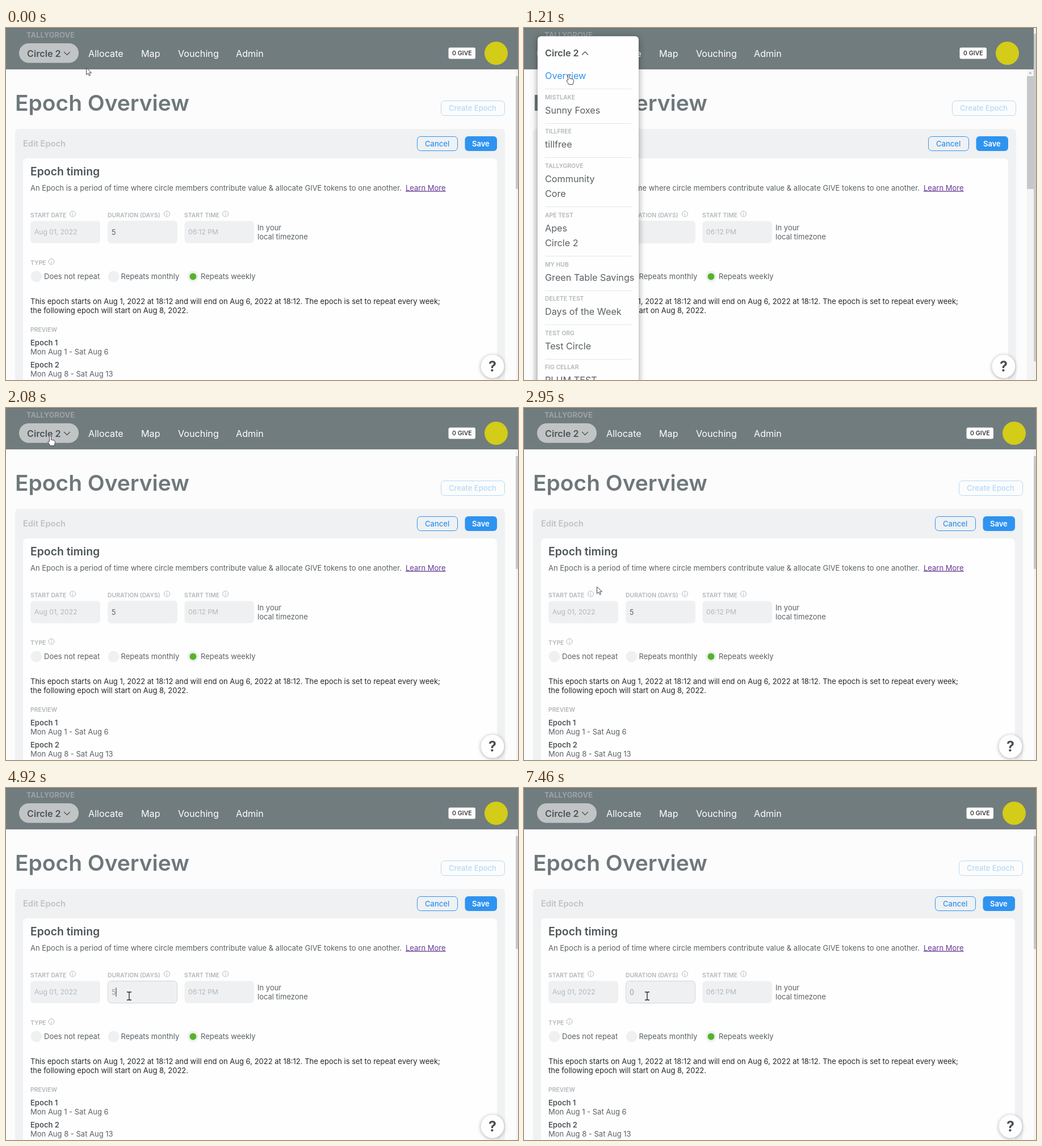
An HTML page for the animation above (8 s loop, 902 by 621 pixels).

```html
<!DOCTYPE html>
<html lang="en">
<head>
<meta charset="utf-8">
<title>Epoch overview</title>
<style>
html, body { margin: 0; width: 100%; height: 100%; overflow: hidden; background: #fcfcfc; }
svg { display: block; font: 13px Inter, sans-serif; --shift: 0px; }
text { white-space: pre; fill: #5a6165; }
.right { transform: translateX(calc(-1 * var(--shift))); }
.panel { width: calc(863px - var(--shift)); fill: #eff1f3; }
.card { width: calc(835px - var(--shift)); fill: #fefefe; }
.nav text { font-size: 16.2px; fill: #fff; }
.label { font-size: 10.4px; font-weight: 600; fill: #b1b7b9; }
.item { font-size: 16.2px; }
.strong { font-weight: 600; fill: #4d5457; }
.circle { font-size: 16.2px; font-weight: 600; fill: #4d5457; }
.dark { fill: #24282a; }
.field { fill: #eff0f2; }
.muted { font-size: 12.1px; fill: #b3b8bb; }
.line { fill: none; stroke: #4d5457; stroke-width: 1.3; stroke-linecap: round; stroke-linejoin: round; }
.info { fill: none; stroke: #b1b7b9; }
#menu { filter: drop-shadow(0 2px 6px #0006); }
</style>
</head>
<body>
<svg id="stage" width="902" height="621" viewBox="0 0 902 621">
  <defs>
    <g id="info" class="info"><circle r="5"/><path d="M0-.5V3M0-3v1.2"/></g>
    <path id="arrow" d="M.5 .5V12.5l3-2.8 2 4.6 2-1-2-4.3h4z" fill="#fff" stroke="#333" stroke-width=".9"/>
    <path id="hand" d="M-1.5 10V1.5a1.5 1.5 0 0 1 3 0V7l5 1q1.8.5 1.8 2.5v2.5q0 2-1.4 4.5H0L-3.7 12q-.9-2 .8-2.2z" fill="#fff" stroke="#444"/>
    <path id="beam" d="M-4-7h3l1 1 1-1h3M0-6V6M-4 7h3l1-1 1 1h3" fill="none" stroke="#222" stroke-width="1.3"/>
  </defs>

  <rect width="902" height="621" fill="#fcfcfc"/>
  <rect width="902" height="73" fill="#717c7f"/>
  <rect width="902" height="1" fill="#667174"/>
  <text x="36" y="17" style="font-weight:700;fill:#9ba3a5">TALLYGROVE</text>
  <rect x="23" y="27" width="105" height="34.5" rx="17.2" fill="#c1c4c5"/>
  <text class="circle" x="37" y="50.5">Circle 2</text>
  <path class="line" d="M102.500 42.500l5 5 5-5"/>
  <g class="nav">
    <text x="145" y="50.500">Allocate</text>
    <text x="238" y="50.500">Map</text>
    <text x="303" y="50.500">Vouching</text>
    <text x="405" y="50.500">Admin</text>
  </g>

  <text x="16" y="146" style="font-size:38.900px;font-weight:600;fill:#6e787b">Epoch Overview</text>
  <rect class="panel" x="16" y="178" height="460" rx="7"/>
  <text x="30" y="209" style="font-size:14.600px;font-weight:600;fill:#bfc3c6">Edit Epoch</text>
  <rect class="card" x="30" y="230" height="420" rx="7"/>

  <g class="right">
    <rect x="779.500" y="34.500" width="47.500" height="20" rx="3" fill="#fdfdfd"/>
    <text x="786" y="48" style="font-size:10.700px;font-weight:500;fill:#222">0 GIVE</text>
    <circle cx="863.500" cy="44.500" r="20.500" fill="#d3cc18"/>
    <g fill="none" stroke="#b5d9f7">
      <rect x="766.500" y="128.500" width="112" height="26" rx="6"/>
      <rect x="724.500" y="191.500" width="71" height="25" rx="6" stroke="#2f93f0"/>
    </g>
    <rect x="808.500" y="191" width="56.500" height="26" rx="6" fill="#2f93f0"/>
    <g style="font-weight:500">
      <text x="780" y="146" style="fill:#b5d9f7">Create Epoch</text>
      <text x="738" y="208.500" style="fill:#2f93f0">Cancel</text>
      <text x="821" y="208.500" style="fill:#fff;font-weight:600">Save</text>
    </g>
  </g>

  <text class="strong" x="43" y="260" style="font-size:19.400px">Epoch timing</text>
  <text x="43" y="286.500">An Epoch is a period of time where circle members contribute value &amp; allocate GIVE tokens to one another.</text>
  <text x="704" y="286.500" style="fill:#663a94;text-decoration:underline">Learn More</text>

  <g class="label">
    <text class="label" x="43" y="333.500">START DATE</text>
    <text class="label" x="179" y="333.500">DURATION (DAYS)</text>
    <text class="label" x="314" y="333.500">START TIME</text>
    <text class="label" x="43" y="417.500">TYPE</text>
    <text class="label" x="43" y="536">PREVIEW</text>
  </g>
  <use href="#info" x="117.500" y="328"/>
  <use href="#info" x="283.500" y="328"/>
  <use href="#info" x="386.500" y="328"/>
  <use href="#info" x="80" y="412"/>

  <rect class="field" x="43" y="340.500" width="123" height="39" rx="6"/>
  <rect class="field" id="duration" x="179.500" y="340.500" width="122" height="39" rx="6"/>
  <rect class="field" x="314.500" y="340.500" width="122.500" height="39" rx="6"/>
  <text class="muted" x="50" y="364">Aug 01, 2022</text>
  <text id="days" x="186" y="364.500" style="font-size:12.600px">5</text>
  <text class="muted" x="321" y="364">06:12 PM</text>
  <rect id="caret" x="193.500" y="352" width="1" height="16" fill="#333"/>
  <text x="443" y="356.500">In your</text>
  <text x="443" y="372.500">local timezone</text>

  <g fill="#eff0f2">
    <circle cx="53.500" cy="438.500" r="10"/>
    <circle cx="189.500" cy="438.500" r="10"/>
    <circle cx="329.500" cy="438.500" r="10"/>
    <circle cx="329.500" cy="438.500" r="6" fill="#56b32b"/>
  </g>
  <text x="67" y="443">Does not repeat</text>
  <text x="202.500" y="443">Repeats monthly</text>
  <text x="343" y="443">Repeats weekly</text>

  <text class="dark" x="43" y="487">This epoch starts on Aug 1, 2022 at 18:12 and will end on Aug 6, 2022 at 18:12. The epoch is set to repeat every week;</text>
  <text class="dark" x="43" y="503">the following epoch will start on Aug 8, 2022.</text>
  <text class="strong" x="43" y="559.500">Epoch 1</text>
  <text x="43" y="576">Mon Aug 1 - Sat Aug 6</text>
  <text class="strong" x="43" y="598.500">Epoch 2</text>
  <text x="43" y="614.500">Mon Aug 8 - Sat Aug 13</text>

  <g class="right">
    <circle cx="857" cy="597" r="20.500" fill="#fefefe" style="filter:drop-shadow(0 1px 3px #0005)"/>
    <text x="857" y="606" text-anchor="middle" style="font-size:25px;font-weight:700;fill:#4a4f52">?</text>
    <rect x="898" y="73" width="12" height="548" fill="#f3f3f3"/>
    <path d="M901.500 80.500l2.500-3 2.500 3z" fill="#a5a5a5"/>
    <rect x="898" y="85" width="12" height="199" fill="#c6c7c8"/>
  </g>

  <g id="overlay">
    <rect x="898" width="4" height="621" fill="#f0f0f0"/>
    <rect x="898" y="10" width="4" height="578" fill="#c9cacb"/>
    <g id="menu">
      <rect x="24" y="14.500" width="178" height="640" rx="6" fill="#fefefe"/>
      <text class="circle" id="current" x="37" y="50">Circle 2</text>
      <path class="line" id="chevron" d="M102.500 47l5-5 5 5"/>
      <text class="item" id="overview" x="37" y="90">Overview</text>
    </g>
  </g>
  <use id="cursor"/>
</svg>
<script>
const $ = id => document.getElementById(id);

const groups = [
  ['MISTLAKE', 'Sunny Foxes'],
  ['TILLFREE', 'tillfree'],
  ['TALLYGROVE', 'Community', 'Core'],
  ['APE TEST', 'Apes', 'Circle 2'],
  ['MY HUB', 'Green Table Savings'],
  ['DELETE TEST', 'Days of the Week'],
  ['TEST ORG', 'Test Circle'],
  ['FIG CELLAR', 'PLUM TEST'],
];
let y = 107.7, rows = '';
for (const [label, ...items] of groups) {
  rows += `<path d="M37 ${Math.floor(y) + .5}h152" stroke="#e4e6e7"/>
    <text class="label" x="37" y="${y + 17.8}">${label}</text>`;
  items.forEach((name, i) => {
    rows += `<text class="item" x="37" y="${y + 42.8 + i * 26.6}">${name}</text>`;
  });
  y += 60.5 + (items.length - 1) * 26.6;
}
$('menu').insertAdjacentHTML('beforeend', rows);

// time, pointer shape, x, y
const path = [
  [0, 'arrow', 141, 70], [199, 'arrow', 141, 70],
  [200, 'hand', 104, 54], [250, 'hand', 84, 48], [290, 'hand', 76, 45],
  [990, 'hand', 76, 45], [1210, 'hand', 79, 82], [1250, 'hand', 79, 82], [1290, 'hand', 80, 84],
  [1450, 'hand', 80, 84], [1780, 'hand', 72, 39], [1929, 'hand', 72, 39],
  [1930, 'hand', 80, 42], [2079, 'hand', 80, 42],
  [2080, 'hand', 78, 49], [2450, 'hand', 78, 49], [2510, 'arrow', 86, 66],
  [2800, 'arrow', 133, 270], [2950, 'arrow', 128, 315], [3890, 'arrow', 128, 315],
  [4080, 'beam', 182, 357], [4170, 'arrow', 210, 381], [4250, 'arrow', 238, 400],
  [4290, 'arrow', 239, 399], [4330, 'arrow', 239, 399], [4410, 'beam', 217, 376],
  [4619, 'beam', 217, 376], [4620, 'beam', 217, 367], [8000, 'beam', 217, 367],
];

const ramp = (t, from, to) => Math.min(1, Math.max(0, (t - from) / (to - from)));
const mix = (a, b, k) => `rgb(${a.map((v, i) => Math.round(v + (b[i] - v) * k))})`;
const BLUE = [47, 147, 240], DARK = [77, 84, 87], TEXT = [90, 97, 101];

function draw(t) {
  const i = path.findIndex(p => p[0] > t) - 1;
  const [t0, shape, x0, y0] = path[i], [t1, , x1, y1] = path[i + 1];
  const k = ramp(t, t0, t1);
  const x = Math.round(x0 + (x1 - x0) * k), y = Math.round(y0 + (y1 - y0) * k);
  $('cursor').setAttribute('href', '#' + shape);
  $('cursor').setAttribute('transform', `translate(${x} ${y})`);

  const open = t >= 250 && t < 2080;
  $('overlay').style.display = open ? '' : 'none';
  $('stage').style.setProperty('--shift', open ? '12px' : '0px');
  const onCurrent = ramp(t, 290, 630) - ramp(t, 990, 1200) + ramp(t, 1550, 1780);
  const onOverview = ramp(t, 1040, 1200) - ramp(t, 1500, 1700);
  $('current').style.fill = $('chevron').style.stroke = mix(DARK, BLUE, onCurrent);
  $('overview').style.fill = mix(TEXT, BLUE, onOverview);

  const focus = t < 4790 ? 0 : t < 4920 ? .5 : 1;
  $('duration').style.stroke = mix([239, 240, 242], [208, 212, 215], focus);
  $('days').style.fill = mix(TEXT, [150, 156, 159], focus);
  $('days').textContent = t < 6960 ? 5 : 0;
  const blink = [4790, 5330, 5830, 6390, 6880, 7460].filter(b => b <= t).length;
  $('caret').style.display = blink % 2 ? '' : 'none';
}

const start = performance.now();
function tick() {
  draw((performance.now() - start) % 8000);
  requestAnimationFrame(tick);
}
tick();
</script>
</body>
</html>
```
